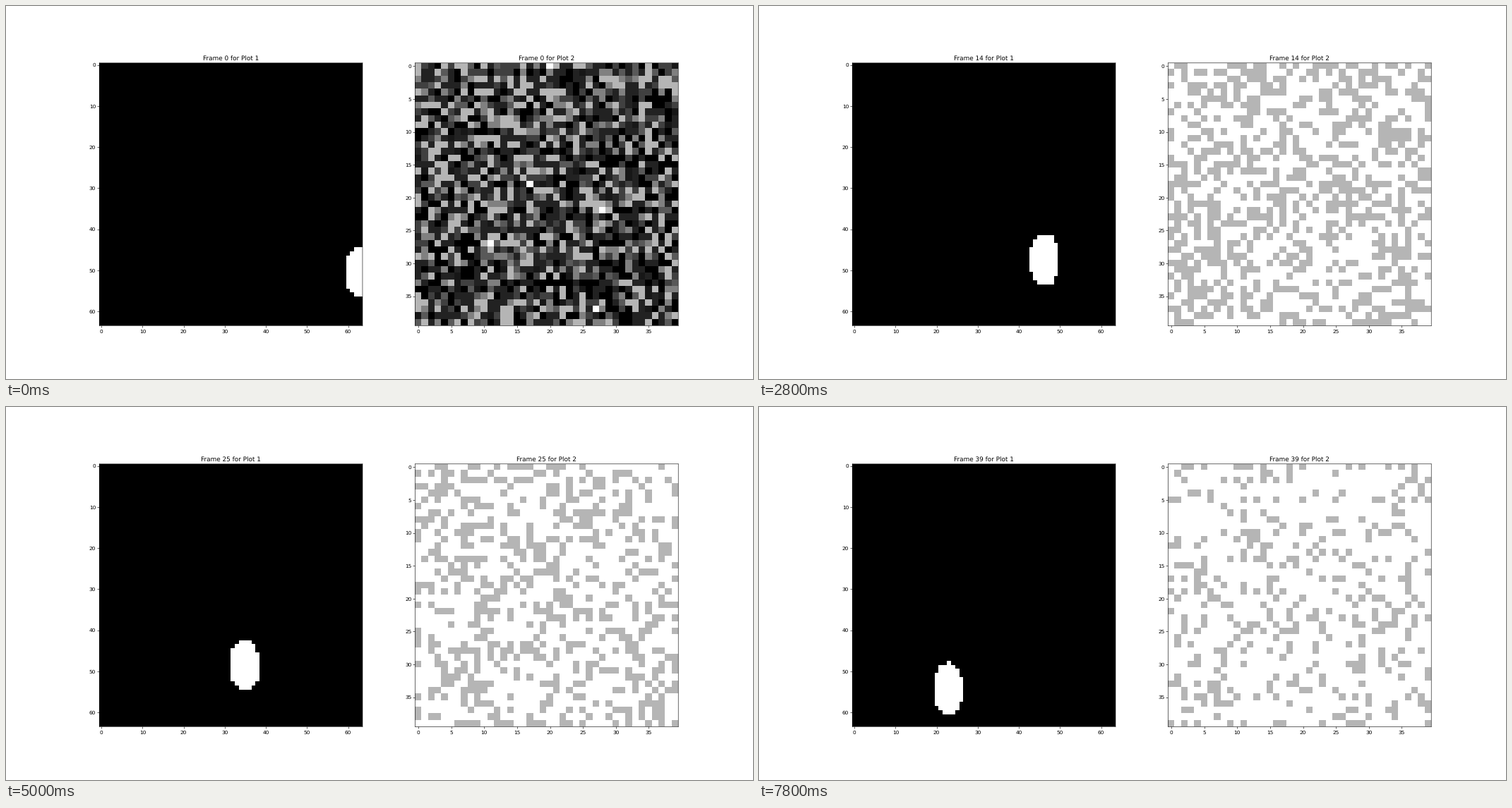
A matplotlib script that plays this animation: 1058 by 529 pixels, repeating every 8000 ms.

```python
import numpy as np
import matplotlib.pyplot as plt
from matplotlib.animation import FuncAnimation

FRAMES = 40
INTERVAL = 200
BLOB_SIZE = 64
NOISE_SIZE = 40
RISE = 6  # frames until the noise has brightened

# Starting shares of the grey shades, white aside
SHADES = np.array([0, 0.09, 0.133, 0.25, 0.354, 0.5, 0.71])
SHARES = np.array([0.22, 0.03, 0.27, 0.11, 0.07, 0.09, 0.21])


def blob(t):
    """Binary ellipse that slows down leftwards along a shallow arc."""
    cx = 63.15 - 1.297 * t + 0.0068 * t**2
    cy = 47.45 + 0.0123 * (t - 15.3) ** 2
    rx = 3.6 + 0.4 * np.exp(-t / 7)
    ry = 6.15 + 0.009 * t
    y, x = np.mgrid[:BLOB_SIZE, :BLOB_SIZE]
    return (((x - cx) / rx) ** 2 + ((y - cy) / ry) ** 2 <= 1).astype(float)


def noise(t):
    """Random grid: white spreads while a rising floor removes dark shades."""
    rng = np.random.default_rng(100 + t)
    u = min(t / RISE, 1)
    white = max(0.003, (0.45 + 0.0083 * t) * u * u * (3 - 2 * u))
    floor = min(0.075 * t, SHADES[-1])
    grey = np.where(SHADES >= floor, SHARES, 0)
    weights = np.append(grey / grey.sum() * (1 - white), white)
    return rng.choice(np.append(SHADES, 1), (NOISE_SIZE, NOISE_SIZE), p=weights)


# Unhinted text and unsnapped lines keep fractional positions
plt.rcParams["text.hinting"] = "none"
fig, axes = plt.subplots(1, 2, figsize=(20, 10), dpi=52.9)
plots = []
for ax, make in zip(axes, (blob, noise)):
    image = ax.imshow(make(0), cmap="gray", vmin=0, vmax=1,
                      interpolation="nearest")
    for spine in ax.spines.values():
        spine.set_snap(False)
    plots.append((ax, image, make))


def update(t):
    for number, (ax, image, make) in enumerate(plots, 1):
        image.set_data(make(t))
        ax.set_title(f"Frame {t} for Plot {number}")
    return [image for _, image, _ in plots]


anim = FuncAnimation(fig, update, frames=FRAMES, interval=INTERVAL,
                     repeat=True, repeat_delay=0, blit=False)
plt.show()
```
